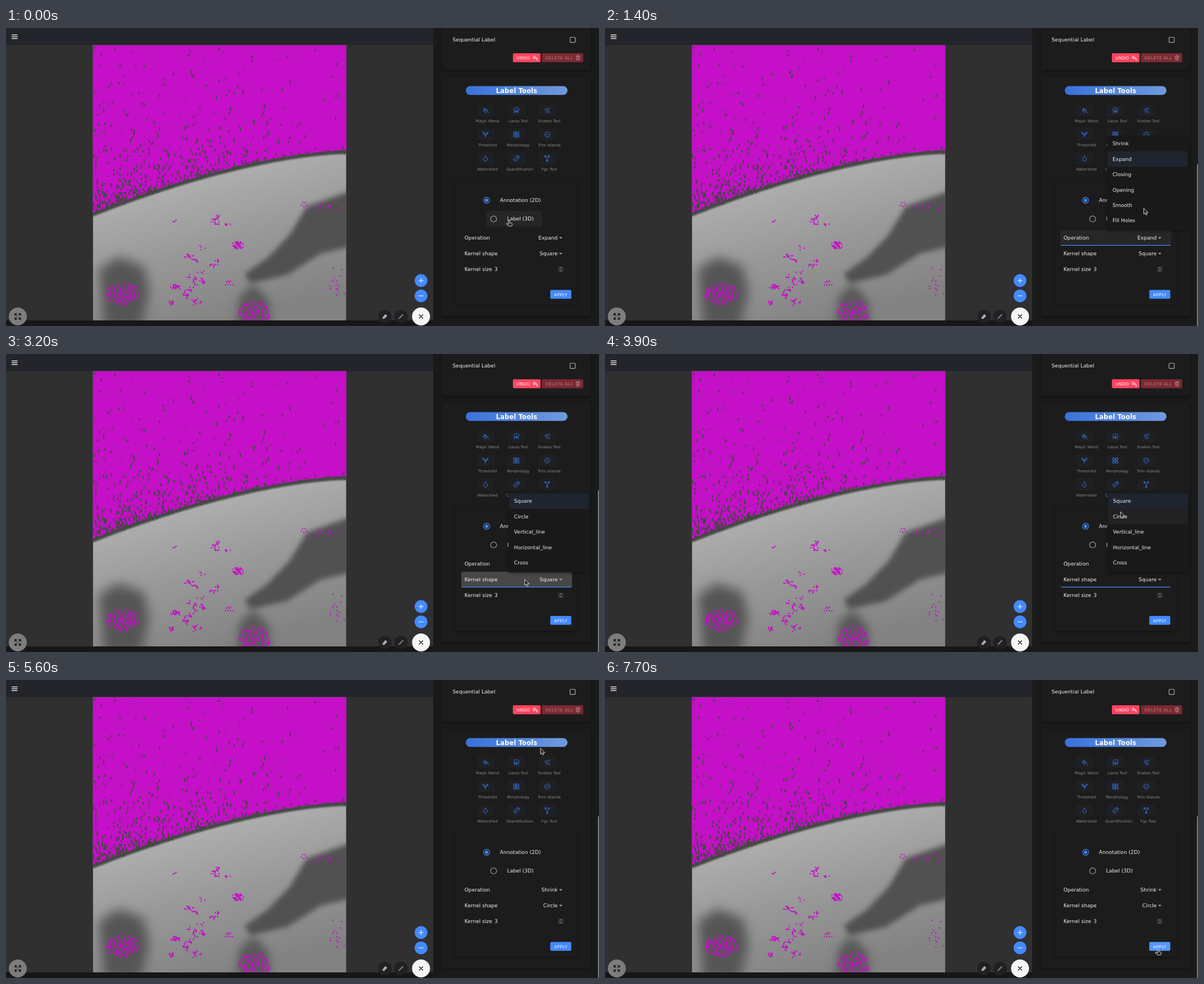
These frames come from a looping animation (1055x531 px, 8000 ms). An HTML page with a canvas:

```html
<!DOCTYPE html>
<html lang="en">
<head>
<meta charset="utf-8">
<title>Label tools</title>
<style>
  html, body { margin: 0; width: 100%; height: 100%; overflow: hidden; background: #303030; }
  canvas { display: block; }
</style>
</head>
<body>
<canvas id="stage" width="1055" height="531"></canvas>
<script>
const W = 1055, H = 531, LOOP = 8000;
const BLUE = '#448aff', WHITE = '#f2f2f2', MAGENTA = '#c410c7';
let c = document.getElementById('stage').getContext('2d');

const clamp = v => Math.max(0, Math.min(1, v));
const span = (t, from, to) => clamp((t - from) / (to - from));
const easeOut = k => 1 - (1 - k) ** 2;
const easeInOut = k => k * k * (3 - 2 * k);

function seeded(seed) {
  return () => {
    seed = (seed + 0x6D2B79F5) | 0;
    let r = Math.imul(seed ^ (seed >>> 15), 1 | seed);
    r = (r + Math.imul(r ^ (r >>> 7), 61 | r)) ^ r;
    return ((r ^ (r >>> 14)) >>> 0) / 4294967296;
  };
}

function rect(x, y, w, h, fill, r = 0) {
  c.fillStyle = fill;
  c.beginPath();
  c.roundRect(x, y, w, h, r);
  c.fill();
}

function disc(x, y, r, fill) {
  c.fillStyle = fill;
  c.beginPath();
  c.arc(x, y, r, 0, 7);
  c.fill();
}

function ring(x, y, r, color) {
  c.strokeStyle = color;
  c.lineWidth = 1.2;
  c.beginPath();
  c.arc(x, y, r, 0, 7);
  c.stroke();
}

function text(s, x, cy, { size = 9.1, color = WHITE, align = 'left', spacing = 0, weight = '' } = {}) {
  c.font = `${weight} ${size}px "DejaVu Sans", sans-serif`;
  c.letterSpacing = spacing + 'px';
  c.textAlign = align;
  c.fillStyle = color;
  c.fillText(s, x, cy + size * 0.365);
}

function icon(d, x, y, color, width = 1, fill) {
  c.save();
  c.translate(x, y);
  const p = new Path2D(d);
  c.lineWidth = width;
  c.lineJoin = c.lineCap = 'round';
  c.strokeStyle = color;
  if (fill) { c.fillStyle = fill; c.fill(p); }
  c.stroke(p);
  c.restore();
}

function card(x, y, w, h, fill) {
  c.save();
  c.shadowColor = 'rgba(0,0,0,.4)';
  c.shadowBlur = 5;
  c.shadowOffsetY = 1.5;
  rect(x, y, w, h, fill, 2);
  c.restore();
}

function layer(draw) {
  const el = document.createElement('canvas');
  el.width = W;
  el.height = H;
  const saved = c;
  c = el.getContext('2d');
  draw();
  c = saved;
  return el;
}

// ---- Scan with label overlay ----
const SCAN = { x: 154.6, y: 30.6, w: 450.8, h: 490.4 };
const CELL = 2.254;
const edgeY = x => 219 + 111 * clamp(1 - (x - SCAN.x) / SCAN.w) ** 1.6;

function softShape(d, color, blur) {
  c.filter = `blur(${blur}px)`;
  c.fillStyle = color;
  c.fill(new Path2D(d));
  c.filter = 'none';
}

// Paints one cell of the label grid
function cell(x, y, color, tall = 1) {
  const col = Math.floor((x - SCAN.x) / CELL), row = Math.floor((y - SCAN.y) / CELL);
  rect(SCAN.x + col * CELL, SCAN.y + row * CELL, CELL, CELL * tall, color);
}

function island(rnd, x, y, w, h, count) {
  while (count-- > 0) {
    const a = rnd() * Math.PI * 2, r = rnd() ** 0.6;
    cell(x + Math.cos(a) * r * w, y + Math.sin(a) * r * h, MAGENTA);
  }
}

function drawScan() {
  const rnd = seeded(11);
  c.save();
  c.beginPath();
  c.rect(SCAN.x, SCAN.y, SCAN.w, SCAN.h);
  c.clip();

  const tone = c.createLinearGradient(330, 260, 400, 521);
  tone.addColorStop(0, '#b0b0b0');
  tone.addColorStop(0.5, '#989898');
  tone.addColorStop(1, '#828282');
  rect(SCAN.x, SCAN.y, SCAN.w, SCAN.h, tone);
  softShape('M620 288L535 318L505 368L465 410L425 438L435 455L500 440L560 402L620 388Z', '#515151', 5);
  softShape('M165 430L200 408L245 425L255 470L240 535H175Z', '#555', 10);
  softShape('M415 480L440 455L468 485L470 535H410Z', '#595959', 8);

  // Label down to the edge, with a dark rim below it
  const label = new Path2D(), rim = new Path2D();
  label.moveTo(SCAN.x, SCAN.y);
  for (let x = 150; x <= 610; x += 4) {
    label.lineTo(x, edgeY(x) - 1);
    rim.lineTo(x, edgeY(x) + 1);
  }
  label.lineTo(610, SCAN.y);
  c.filter = 'blur(1.5px)';
  c.strokeStyle = '#454845';
  c.lineWidth = 9;
  c.stroke(rim);
  c.filter = 'none';
  c.fillStyle = MAGENTA;
  c.fill(label);

  // Gaps thicken towards the edge and the left
  for (let x = SCAN.x + 1; x < 605; x += CELL) {
    const left = clamp((540 - x) / 385), edge = edgeY(x);
    for (let y = SCAN.y + 1; y < edge; y += CELL) {
      const d = edge - y;
      const p = 0.002 + left * (0.006 + 0.085 * Math.exp(-d / 70) + 0.2 * Math.exp(-d / 22))
        + 0.25 * Math.exp(-d / 3);
      if (rnd() < p) cell(x, y, '#404841', 1 + Math.floor(rnd() * 2.3));
    }
  }

  island(rnd, 208, 474, 30, 20, 190);
  island(rnd, 442, 508, 28, 24, 190);
  island(rnd, 413, 386, 11, 7, 45);
  island(rnd, 302, 461, 9, 4, 25);
  for (let i = 0; i < 24; i++) {
    const x = 290 + rnd() * 110;
    island(rnd, x, 335 + rnd() * 160, 3 + rnd() * 8, 2 + rnd() * 4, 3 + rnd() * 9);
  }
  island(rnd, 560, 318, 42, 10, 22);
  island(rnd, 590, 450, 14, 40, 14);
  c.restore();
}

// ---- Static interface ----
const TOOLS = [
  ['Magic Wand', 'M-3.5 0L0 -3.5L4 .5L.5 4ZM-3 -4.5L0 -1M-3.5 0H3M5 3v1.5'],
  ['Lasso Tool', 'M-3 2C-6 -1 -4 -5 0 -5S6 -2 4 1M-3 2C-1 3 -1 0 -3 1M-3 2L-4 5M0 -1L4 4M0 -1V4L2 2.5Z'],
  ['Snakes Tool', 'M-4 -3h2M0 -4h1M-4 0h3l2 2h3M2 -3l2 1M-2 3l2 1M3 4h1M-1 -2l2 1M4 -5v2'],
  ['Threshold', 'M-5 -4H-3L0 0V5M5 -4H3L0 0M-4 -4V-1L0 1L4 -1V-4'],
  ['Morphology', 'M-4.5 -4.5h3.6v3.6h-3.6ZM.9 -4.5h3.6v3.6H.9ZM-4.5 .9h3.6v3.6h-3.6ZM.9 .9h3.6v3.6H.9Z'],
  ['Trim Islands', 'M-4.5 0a4.5 4.5 0 1 1 9 0a4.5 4.5 0 1 1 -9 0M-2 0H2'],
  ['Watershed', 'M0 -4.5C5 1 3.5 4.5 0 4.5S-5 1 0 -4.5Z'],
  ['Quantification', 'M-5 1L1 -5H4L5 -4V-1L-1 5ZM-3 3L3 -3M2 -3.5h1'],
  ['Fgc Tool', 'M-4 -5h2v2h-2ZM2 -5h2v2H2ZM-1 3h2v2h-2ZM-3 -3L0 0L3 -3M0 0V3']
];
const CAPS = { size: 7.43, spacing: 0.46, color: '#fff' };

function drawButtons() {
  disc(21, 514, 16, '#7d7d80');
  const corner = 'M-5 -2V-5H-2M-5 -5L-1.6 -1.6';
  for (let i = 0; i < 4; i++) {
    c.save();
    c.translate(21, 514);
    c.rotate(i * Math.PI / 2);
    icon(corner, 0, 0, '#111', 1.3);
    c.restore();
  }
  disc(738.4, 450, 11.4, BLUE);
  icon('M-4 0H4M0 -4V4', 738.4, 450, '#fff', 1.1);
  disc(738.4, 477.3, 11.4, BLUE);
  icon('M-4 0H4', 738.4, 477.3, '#fff', 1.1);
  disc(674, 514, 12, '#202124');
  icon('M-4 2L1 -4L4 -1L-1 4H-3Z', 674, 514, '#aaa', 0.8, '#aaa');
  disc(702.7, 514, 12, '#202124');
  icon('M-4 4L-3 2L3 -4L4 -3L-2 3Z', 702.7, 514, '#888', 0.8, '#888');
  disc(738.4, 514, 16, '#f5f5f5');
  icon('M-3 -3L3 3M3 -3L-3 3', 738.4, 514, '#111', 1.4);
}

function drawFrame() {
  rect(0, 0, W, H, '#303030');
  rect(0, 0, 760, 30.6, '#23252a');
  for (let i = 0; i < 3; i++) rect(10, 11.7 + i * 3.2, 10.5, 1.3, '#fff');
  drawScan();
  rect(0, 521, 760, 10, '#171717');
  drawButtons();

  rect(760, 0, 295, H, '#1a1a1a');
  card(776, -10, 264, 84, '#1c1c1c');
  card(776, 87, 264, 426, '#1c1c1c');
  card(800, 272, 217, 221, '#1c1c1c');

  text('Sequential Label', 794.6, 21);
  c.strokeStyle = '#aaa';
  c.lineWidth = 1.2;
  c.beginPath();
  c.roundRect(1003.5, 16.5, 9.2, 9.2, 1);
  c.stroke();
  rect(901.8, 45, 49.2, 16, '#ff4560', 2);
  text('UNDO', 908, 53, CAPS);
  icon('M-1 -4L-4 -1L-1 2V0H1Q3 0 4 4Q5 -2 -1 -2Z', 941, 53.5, '#fff', 0.9);
  rect(953.3, 45, 73.5, 16, '#7c2933', 2);
  text('DELETE ALL', 960, 53, { ...CAPS, color: '#a78b8f' });
  icon('M-3.5 -3H3.5M-1 -4H1M-3 -2L-2.4 4H2.4L3 -2ZM-1 -1V3M1 -1V3', 1017.5, 53, '#a78b8f', 0.9);

  const pill = c.createLinearGradient(818, 0, 999, 0);
  pill.addColorStop(0, '#3972db');
  pill.addColorStop(1, '#6f9ade');
  rect(818, 103.4, 181, 15.8, pill, 8);
  text('Label Tools', 908.5, 111.4, { size: 11.4, align: 'center', spacing: 0.2, weight: 'bold', color: '#fff' });

  TOOLS.forEach(([name, d], i) => {
    const x = 853 + (i % 3) * 55, y = 147 + Math.floor(i / 3) * 42.8;
    rect(x - 15, y - 10, 31, 20, '#1e2024', 3);
    icon(d, x, y, '#3f83f5', 0.9);
    const shift = name.length > 12 ? 6 : 3.5;
    text(name, x + shift, y + 18.5, { size: 6.85, color: '#8a8a8a', align: 'center' });
  });
}

// ---- Moving parts ----
const ROW = 27.35;
const OP_MENU = { x: 893.5, y: 192, items: ['Shrink', 'Expand', 'Closing', 'Opening', 'Smooth', 'Fill Holes'] };
const SHAPE_MENU = { x: 894.3, y: 248, items: ['Square', 'Circle', 'Vertical_line', 'Horizontal_line', 'Cross'] };

function drawMenu({ x, y, items }, { alpha, scale = 1, selected, hover, ripple = 0 }) {
  if (alpha <= 0) return;
  const h = items.length * ROW + 4.6;
  const sheet = layer(() => {
    card(x, y, 143, h, '#191919');
    items.forEach((name, i) => {
      const top = y + 0.5 + i * ROW;
      if (i === selected) rect(x, top, 143, ROW, '#1f252e');
      if (i === hover) {
        rect(x, top, 143, ROW, 'rgba(255,255,255,.04)');
        rect(x, top, 143 * ripple, ROW, 'rgba(255,255,255,.06)');
      }
      text(name, x + 9.5, top + ROW / 2);
    });
  });
  c.save();
  c.globalAlpha = alpha;
  const ox = x + 71.5, oy = y + h + 3;
  c.translate(ox, oy);
  c.scale(scale, scale);
  c.drawImage(sheet, -ox, -oy);
  c.restore();
}

function drawField(label, value, y) {
  text(label, 815.7, y);
  text(value, 981.3, y, { align: 'right' });
  icon('M-2.7 -1.2H2.7L0 1.5Z', 987, y, '#aaa', 0.2, '#aaa');
}

function rowFill(y, left, color, alpha = 1) {
  c.globalAlpha = alpha;
  rect(left, y - 14, 1007 - left, 27.5, color, 2);
  c.globalAlpha = 1;
}

function underline(y, k) {
  rect(908.5 - 97.5 * k, y + 12.8, 195 * k, 1.2, BLUE);
}

// Pointer moves: start, end, x, y
const MOVES = [
  [100, 600, 925, 349], [700, 900, 961, 373], [1200, 1700, 954, 227], [1900, 2000, 951, 214],
  [2000, 2400, 923, 402], [3200, 4000, 917, 276], [4000, 4400, 912, 286], [5000, 5600, 951, 122],
  [5600, 6000, 999, 400], [6000, 6700, 984, 480]
];
const ARROW = 'M0 0V10L2.3 8L4 11.6L5.8 10.8L4.2 7.4H7.3Z';
const HAND = 'M-1 0Q0 -1 1 0V4L5 5Q6 5 5.5 7L4.5 10H-1L-5 6Q-4.5 4.5 -3 5.5L-1 7Z';

function drawCursor(t) {
  let x = 895, y = 343;
  for (const [from, to, tx, ty] of MOVES) {
    const k = easeInOut(span(t, from, to));
    x += (tx - x) * k;
    y += (ty - y) * k;
  }
  const hand = t <= 700 || t >= 6600;
  icon(hand ? HAND : ARROW, x, y, '#eee', 0.9, '#1a1a1a');
}

const base = layer(drawFrame);

function draw(t) {
  c.drawImage(base, 0, 0);

  if (t < 800) rect(854, 326, 100, 27.5, '#262626', 2);
  ring(855, 307, 5.3, BLUE);
  disc(855, 307, 2.9, BLUE);
  text('Annotation (2D)', 878.8, 307);
  ring(867.5, 340.2, 5.3, '#9b9b9b');
  text('Label (3D)', 891.4, 340);

  // Row highlights and click ripples
  if (t === 800) rowFill(374, 810, '#262626');
  if (t >= 900) rowFill(374, Math.max(810, 905 - 0.72 * (t - 900)), '#474747', 1 - span(t, 1100, 1500));
  if (t >= 2400 && t < 3200) rowFill(402, 810, '#262626');
  if (t >= 3200) rowFill(402, 810, '#474747', 1 - span(t, 3200, 3600));
  if (t < 3200) underline(374, easeOut(span(t, 800, 1100)));
  else if (t < 4800) underline(402, 1);

  drawField('Operation', t < 2200 ? 'Expand' : 'Shrink', 374);
  drawField('Kernel shape', t < 4600 ? 'Square' : 'Circle', 402);
  text('Kernel size', 815.7, 430);
  text('3', 869, 430);
  rect(982, 425, 10, 10, '#2d2d2f', 1);
  icon('M-2 -1.5L0 -3.5L2 -1.5M-2 1.5L0 3.5L2 1.5', 987, 430, '#aaa', 0.9);

  const warm = span(t, 6500, 6700);
  rect(968.3, 466.8, 37.4, 15.8, `rgb(${68 + 16 * warm},${138 + 14 * warm},255)`, 2);
  text('APPLY', 975, 474.9, CAPS);

  const grow = span(t, 870, 1170);
  drawMenu(OP_MENU, {
    alpha: t < 2200 ? Math.min(1, grow * 2) : 1 - span(t, 2100, 2400),
    scale: 0.75 + 0.25 * easeOut(grow),
    selected: t < 2200 ? 1 : 0,
    hover: t >= 2000 ? 0 : t >= 1600 ? 1 : -1,
    ripple: t >= 2100 ? 0.6 : 0
  });
  drawMenu(SHAPE_MENU, {
    alpha: t < 3200 ? 0 : 1 - span(t, 4530, 4800),
    selected: t < 4600 ? 0 : 1,
    hover: t >= 3900 ? 1 : -1,
    ripple: t >= 4600 ? 0.4 : 0
  });

  const scrollbar = [[100, 1800], [2300, 3900], [5100, LOOP]].some(([from, to]) => t >= from && t < to);
  if (scrollbar) rect(1053, 243, 2, 288, '#777');
  drawCursor(t);
}

// The screen advances in tenths of a second
function tick(now) {
  draw(Math.floor((now % LOOP) / 100) * 100);
  requestAnimationFrame(tick);
}
draw(0);
requestAnimationFrame(tick);
</script>
</body>
</html>
```
